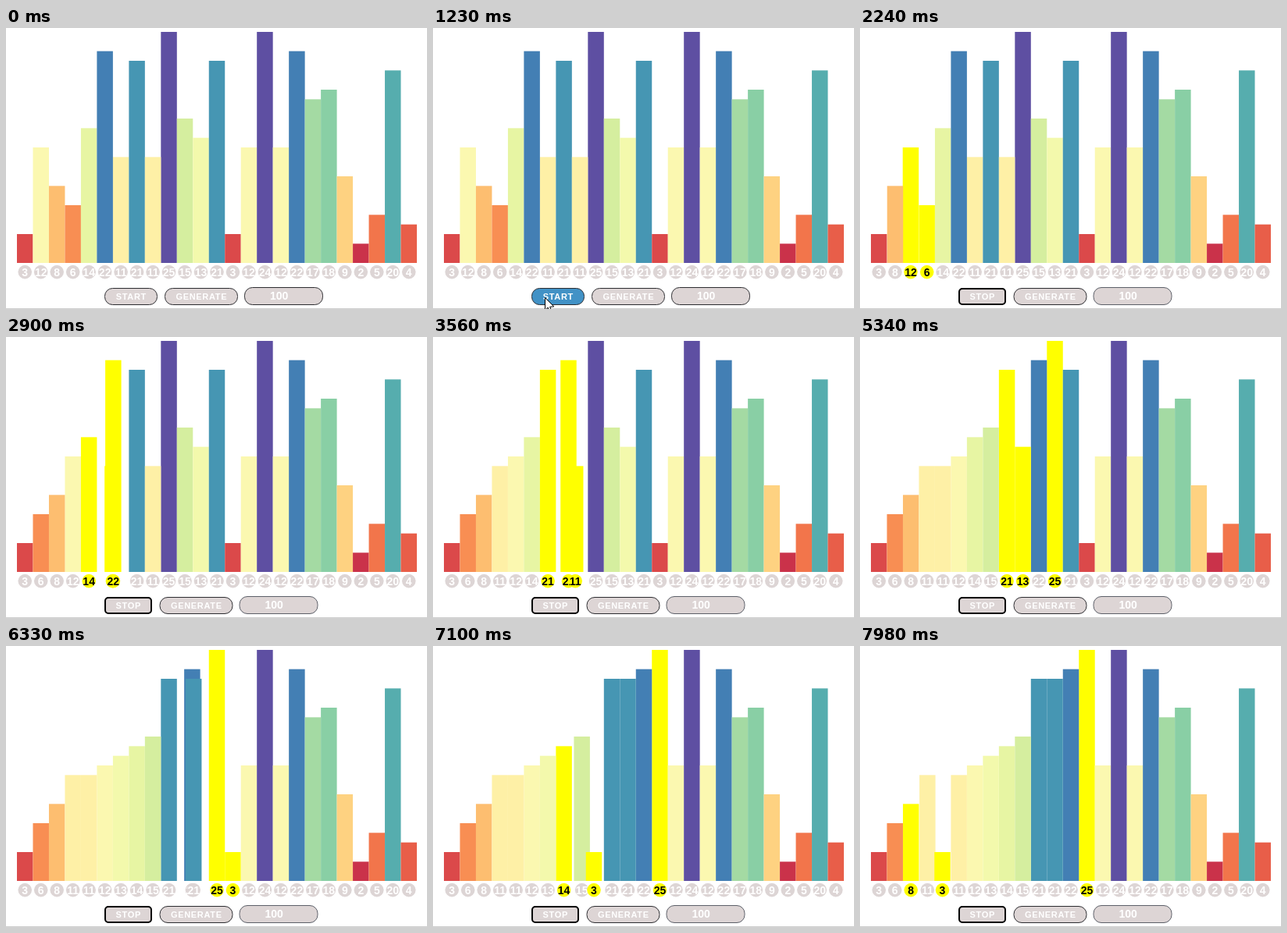
Write an HTML page with a canvas that moves like this. It is 539 px wide and 360 px high and loops after 8 s.

```html
<!DOCTYPE html>
<html lang="en">
<head>
<meta charset="utf-8">
<title>Insertion sort</title>
<style>
html, body { margin: 0; width: 100%; height: 100%; overflow: hidden; background: #fff; }
canvas { display: block; }
</style>
</head>
<body>
<canvas id="stage" width="539" height="360"></canvas>
<script>
const ctx = document.getElementById('stage').getContext('2d');
const LOOP = 8000, CLICK = 1960, SWAP_MS = 130;
const LEFT = 14, PITCH = 20.48, FLOOR = 301, TOP = 5, MAX = 24;
const FONT = '"Liberation Sans", Arial, sans-serif';
const GREY = '#ddd5d5', BLUE = '#4292c6', YELLOW = '#ffff00';

const values = [3, 12, 8, 6, 14, 22, 11, 21, 11, 25, 15, 13, 21, 3, 12, 24, 12, 22, 17, 18, 9, 2, 5, 20, 4];
const spectral = ['9e0142', 'd53e4f', 'f46d43', 'fdae61', 'fee08b', 'ffffbf',
  'e6f598', 'abdda4', '66c2a5', '3288bd', '5e4fa2']
  .map(h => [0, 2, 4].map(i => parseInt(h.slice(i, i + 2), 16)));

// Uniform B-spline through the colour ramp
function ramp(t) {
  const n = spectral.length - 1;
  t = Math.min(1, t);
  const i = Math.min(n - 1, Math.floor(t * n)), u = t * n - i;
  const rgb = [0, 1, 2].map(c => {
    const b = spectral[i][c], d = spectral[i + 1][c];
    const a = i > 0 ? spectral[i - 1][c] : 2 * b - d;
    const e = i < n - 1 ? spectral[i + 2][c] : 2 * d - b;
    return Math.round(((1 - u) ** 3 * a + (4 - 6 * u * u + 3 * u ** 3) * b +
      (1 + 3 * u + 3 * u * u - 3 * u ** 3) * d + u ** 3 * e) / 6);
  });
  return `rgb(${rgb})`;
}

const depth = { 5: 10.5, 8: 11 };
const bars = values.map((value, id) => ({ value, z: depth[id] ?? id, color: ramp(value / MAX) }));

// Record every swap of the insertion sort
const swaps = [];
const order = bars.slice();
for (let i = 1; i < order.length; i++) {
  for (let j = i - 1; j >= 0 && order[j].value > order[j + 1].value; j--) {
    [order[j], order[j + 1]] = [order[j + 1], order[j]];
    swaps.push({ i, left: j, order: order.slice() });
  }
}

// Start time of the n-th swap, linear between [n, ms] points
const pace = [[1, 2130], [3, 2540], [4, 2835], [8, 3507], [13, 4577], [21, 6268],
  [25, 6900], [26, 7060], [30, 7825], [31, 7955], [32, 8120]];
function swapTime(n) {
  const k = Math.max(1, pace.findIndex(p => p[0] >= n));
  const [n0, t0] = pace[k - 1], [n1, t1] = pace[k];
  return t0 + (t1 - t0) * (n - n0) / (n1 - n0);
}
swaps.length = 32;
swaps.forEach((s, k) => { s.time = swapTime(k + 1); });

const clamp = x => Math.max(0, Math.min(1, x));
const ease = x => x < 0.5 ? 4 * x ** 3 : 1 - 4 * (1 - x) ** 3;

function text(str, x, y, size, color, spacing = 0) {
  ctx.font = `bold ${size}px ${FONT}`;
  ctx.letterSpacing = spacing + 'px';
  ctx.textAlign = 'center';
  ctx.fillStyle = color;
  ctx.fillText(str, x + spacing / 2, y);
}

function drawBar(bar, slot, lit) {
  const x = LEFT + slot * PITCH, mid = x + PITCH / 2;
  const h = Math.min(bar.value, MAX) * (FLOOR - TOP) / MAX;
  ctx.fillStyle = lit ? YELLOW : bar.color;
  ctx.fillRect(x, FLOOR - h, PITCH, h);
  ctx.fillStyle = lit ? YELLOW : GREY;
  ctx.beginPath();
  ctx.arc(mid, 312.6, 8.8, 0, 7);
  ctx.fill();
  text(bar.value, mid, 317.5, 14, lit ? '#000' : '#fff');
}

function drawBars(t) {
  const done = swaps.filter(s => s.time <= t).length;
  const now = swaps[done - 1], next = swaps[done];
  const list = now ? now.order : bars;
  const back = now ? 1 - ease(clamp((t - now.time) / SWAP_MS)) : 0;
  const lit = t >= CLICK && next ? [next.i, next.left, next.left + 1] : [];
  list
    .map((bar, slot) => {
      let at = slot;
      if (now && slot === now.left) at += back;
      if (now && slot === now.left + 1) at -= back;
      return { bar, at, lit: lit.includes(slot) };
    })
    .sort((a, b) => a.bar.z - b.bar.z)
    .forEach(d => drawBar(d.bar, d.at, d.lit));
}

function pill(x, y, w, h, r, fill, stroke, line) {
  ctx.beginPath();
  ctx.roundRect(x, y, w, h, r);
  ctx.fillStyle = fill;
  ctx.fill();
  ctx.strokeStyle = stroke;
  ctx.lineWidth = line;
  ctx.stroke();
}

function button(label, x, w, cursor, focus) {
  const over = cursor && cursor[0] > x && cursor[0] < x + w && cursor[1] > 333 && cursor[1] < 355;
  const fill = over ? BLUE : GREY;
  if (focus) pill(x + 1, 334, w - 2, 20, 4, fill, '#000', 2);
  else pill(x + 0.5, 333.5, w - 1, 21, 10, fill, '#2c2c30', 1);
  text(label, x + w / 2, 348, 11, '#fff', 0.7);
}

function drawControls(t, cursor) {
  const running = t >= CLICK;
  const shift = running ? -6.5 : 0;
  button(running ? 'STOP' : 'START', 126, running ? 61 : 68, cursor, running);
  button('GENERATE', 203 + shift, 94, cursor, false);
  pill(305.5 + shift, 332.5, 100, 22, 10, GREY, running ? '#5c5f68' : '#2c2c30', 1);
  text('100', 349.7 + shift, 348.3, 14, '#fff');
}

// Pointer path: [start, end, from, to]
const path = [
  [410, 640, [488, 360], [519, 352]],
  [780, 1230, [519, 352], [143, 345]],
  [2000, 2200, [143, 345], [150, 364]]
];
function cursorAt(t) {
  if (t < path[0][0] || t > path[2][1]) return null;
  const [t0, t1, a, b] = path.filter(p => p[0] <= t).pop();
  const u = clamp((t - t0) / (t1 - t0)), p = u * u * (3 - 2 * u);
  return [a[0] + (b[0] - a[0]) * p, a[1] + (b[1] - a[1]) * p];
}

function drawCursor([x, y]) {
  const outline = [[0, 0], [0, 16], [3.7, 12.6], [6.3, 18.5], [8.6, 17.5], [6.1, 11.8], [11.3, 11.4]];
  ctx.beginPath();
  outline.forEach(([dx, dy]) => ctx.lineTo(x + dx + 0.5, y + dy + 0.5));
  ctx.closePath();
  ctx.fillStyle = '#fff';
  ctx.fill();
  ctx.strokeStyle = '#000';
  ctx.lineWidth = 1;
  ctx.stroke();
}

function frame() {
  const t = performance.now() % LOOP;
  const cursor = cursorAt(t);
  ctx.fillStyle = '#fff';
  ctx.fillRect(0, 0, 539, 360);
  drawBars(t);
  drawControls(t, cursor);
  ctx.fillStyle = '#cfcfcf';
  ctx.fillRect(0, 359, 539, 1);
  if (cursor) drawCursor(cursor);
  requestAnimationFrame(frame);
}
frame();
</script>
</body>
</html>
```
